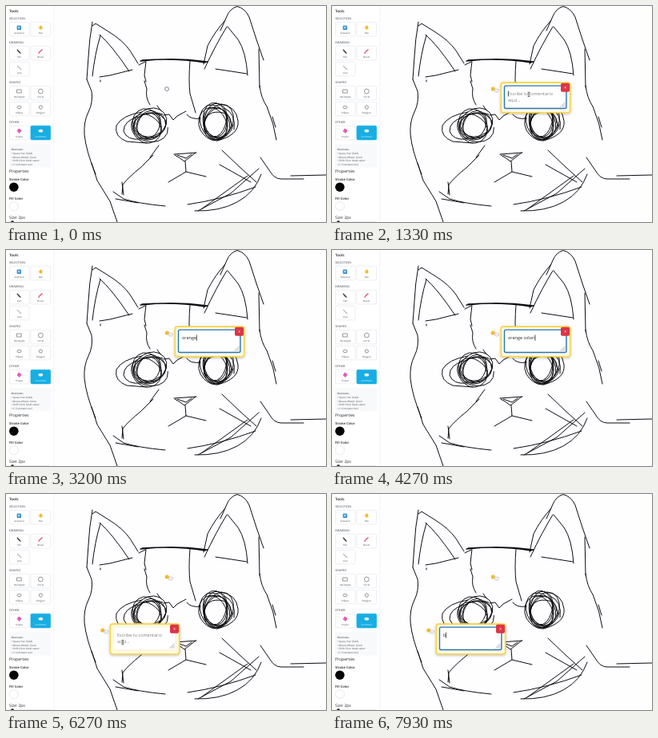
An HTML page that plays this animation: 400x271 px, repeating every 8 s.

```html
<!DOCTYPE html>
<html lang="en">
<head>
<meta charset="utf-8">
<title>Drawing board with comments</title>
<style>
  html, body { margin: 0; width: 100%; height: 100%; overflow: hidden; background: #fff; }
  svg { display: block; width: 100vw; height: 100vh; }
  text { font-family: "Open Sans", "Noto Sans", sans-serif; text-rendering: geometricPrecision; fill: #202327; white-space: pre; }
  .ink { fill: none; stroke: #0c0c10; stroke-width: 1; stroke-linecap: round; stroke-linejoin: round; }
  .heading { font-size: 3.8px; font-weight: 600; fill: #6b7178; }
  .label { font-size: 2.95px; text-anchor: middle; fill: #3f454c; }
  .hint { font-size: 3.1px; fill: #4a5058; }
  .bold { font-weight: 600; }
  .prop { font-size: 4.15px; font-weight: 600; }
  .line { fill: none; stroke: #555; stroke-width: .6; }
  .note { font-size: 5.5px; fill: #222; }
  .placeholder { fill: #808080; }
</style>
</head>
<body>
<svg viewBox="0 0 400 271" preserveAspectRatio="none">
  <defs>
    <filter id="shadow" x="-20%" y="-30%" width="140%" height="170%">
      <feDropShadow dx="0" dy="1.3" stdDeviation="1.6" flood-color="#000" flood-opacity=".25"/>
    </filter>
    <g id="pin">
      <circle r="2.6" fill="#f2bd2c"/>
      <path d="M1.4.4Q4.4-.8 7 .8Q7.8 3 5.8 4.2L3 4Z" fill="#f4f0f4" stroke="#a9a5aa" stroke-width=".5"/>
    </g>
  </defs>
  <rect width="400" height="271" fill="#fefdff"/>

  <g id="cat" class="ink">
    <path d="M108 20Q104 42 103 64L101 92M108 25L112 22L128 32Q146 43 155 56L165 72M166 74L174 70"/>
    <path d="M118 37Q111 60 108 88M117 36Q132 49 154 82M117 89L130 87L158 80M118 93V95"/>
    <path d="M101 92L107 107Q109 121 103 133Q97 145 98 161Q100 182 112 211M107 197L114 219L130 245L139 271"/>
    <path d="M168 69Q209 64 252 70M170 68Q215 65 249 71" stroke-width="1.35"/>
    <path d="M175 69L173 87L175 95M173 94L176 104Q174 115 180 124M189 125L193 131M189 134L196 136M197 137L204 136L209 143L214 138L225 132"/>
    <path d="M230 69Q228 93 230 110L237 134M226 136Q231 143 243 141"/>
    <path d="M247 73L252 50Q261 32 274 18M268 31L276 13Q280 3 289 .5Q299 3 304 14L313 42L322 68M316 54L317 102"/>
    <path d="M276 26Q263 47 248 79M277 26L290 42Q300 57 302 87M262 79L282 82L301 85"/>
    <path d="M317 100Q319 116 326 126Q335 147 338 168M333 139L337 152"/>
    <path d="M318 190L329 206Q335 217 344 217H372M356 213L400 212"/>
    <path d="M191 175L180 190M184 187L169 202Q153 215 146 224L145 236M145 221L147 237"/>
    <path d="M134 233L147 242Q166 248 199 251M137 242L165 247"/>
    <path d="M236 257Q267 258 289 246T319 211M227 249Q269 243 312 227M240 257L281 235L316 204"/>
    <path d="M270 181L292 202L313 221M267 199L306 221M244 255L302 213"/>
    <path d="M210 186L238 184M211 187Q217 190 223 195L237 184M214 187L225 191L232 186M224 195L225 208L203 221M225 208L250 214"/>
    <path d="M170 133Q145 137 138 150Q135 164 151 170L176 172M165 139Q147 144 147 157Q151 169 169 167"/>
    <path d="M269 123Q288 126 290 144T264 169M273 128Q288 135 285 155"/>
    <path id="leftEye"/>
    <path id="rightEye"/>
  </g>

  <g id="sidebar">
    <rect width="59.5" height="271" fill="#fff"/>
    <path d="M59.7 0V271" stroke="#eff0f3" stroke-width=".7"/>
    <text x="4" y="8" class="bold" font-size="4.6">Tools</text>
    <g id="buttons"></g>

    <rect x="13.6" y="24.5" width="5.4" height="5.4" rx="1" fill="#3a92d6"/>
    <path d="M15 25.7L18 27L16.6 27.5L16 29Z" fill="#fff"/>
    <path d="M40.5 26L42 26.8L42.3 24.5L45 25L45.6 28Q44 31 42 29Z" fill="#f3bd31"/>
    <path d="M14 54L18 58L19 60L16.5 59L13.5 55.5Z" fill="#3c4650"/>
    <path d="M41 60Q40.8 58 42 57.5L45.5 54.5" fill="none" stroke="#d84360" stroke-width="1.1"/>
    <path d="M14 75L19 80" class="line" stroke-width="1"/>
    <rect x="13.7" y="105" width="5.4" height="4" class="line"/>
    <circle cx="43.3" cy="107" r="2.9" class="line"/>
    <ellipse cx="16.5" cy="127" rx="2.6" ry="1.7" class="line"/>
    <path d="M42.3 125H44.5L45.6 127L44.5 129H42.3L41.2 127Z" class="line"/>
    <path d="M13.5 157L16 153.5L19.5 156L17 160Z" fill="#e45ab8"/>
    <ellipse cx="43.3" cy="156.7" rx="2.8" ry="1.9" fill="#fff"/>

    <rect x="4" y="173" width="52.5" height="29.5" rx="1.5" fill="#f8f9fa"/>
    <g id="hints"></g>
    <text x="4" y="209.4" font-size="5.1">Properties</text>
    <text x="4" y="219.2" class="prop">Stroke Color</text>
    <circle cx="9.8" cy="227.2" r="5.8" fill="#050505"/>
    <text x="4" y="243.2" class="prop">Fill Color</text>
    <circle cx="9.8" cy="251.3" r="5.6" fill="#fff" stroke="#d9dce0" stroke-width=".6"/>
    <text x="4" y="267" font-size="4.9">Size: 2px</text>
    <path d="M4 271H55" stroke="#d5d8dc"/>
    <circle cx="8" cy="271.2" r="1.9" fill="#222"/>
  </g>

  <use id="pinA" href="#pin" x="201.3" y="104"/>
  <use id="pinB" href="#pin" x="120.8" y="171"/>

  <g id="popup">
    <rect x=".8" y=".8" width="86.4" height="37.6" rx="3" fill="#fff9e2" stroke="#f8d643" stroke-width="1.6" filter="url(#shadow)"/>
    <rect id="field" x="5" y="4.8" width="77.4" height="28.4" rx="2" fill="#fff"/>
    <path d="M77.2 31.4L81 27.6M79.3 31.4L81 29.7M75 31.4L81 25.4" stroke="#777" stroke-width=".55"/>
    <rect x="75.5" y="1.4" width="11" height="11" rx="1.8" fill="#dc3545"/>
    <path d="M80.2 6.1L82 7.9M82 6.1L80.2 7.9" stroke="#fff" stroke-width=".8"/>
    <g id="placeholder">
      <text class="note placeholder" x="9.5" y="16.7">Escribe tu comentario</text>
      <text class="note placeholder" x="9.5" y="25.2">aquí...</text>
    </g>
    <text id="typed" class="note" x="9.5" y="16.7"></text>
    <rect id="caret" y="11.2" width=".7" height="7.2" fill="#111"/>
  </g>

  <g id="cursor">
    <path id="hand" d="M-2.2-.8Q-2.2-2.5-.8-2Q0-2.8.8-2Q2.3-2.2 2.2-.4V1Q1.8 2.5.3 2.6Q-1.4 2.5-2.2 1Z" fill="#fff" stroke="#444" stroke-width=".65"/>
    <path id="beam" d="M-1.4-2.8Q0-2.8 0-2Q0-2.8 1.4-2.8M0-2V2M-1.4 2.8Q0 2.8 0 2Q0 2.8 1.4 2.8" fill="none" stroke="#222" stroke-width=".7"/>
  </g>
</svg>
<script>
const LOOP = 8000, BLINK = 530;
const $ = id => document.getElementById(id);
const show = (id, on) => $(id).setAttribute('visibility', on ? 'inherit' : 'hidden');

function addTo(parent, tag, attrs, text = '') {
  const el = document.createElementNS('http://www.w3.org/2000/svg', tag);
  for (const key in attrs) el.setAttribute(key, attrs[key]);
  el.textContent = text;
  parent.append(el);
}

function buildSidebar() {
  const sections = [
    ['SELECTION', 17, ['Selection', 'Pan']],
    ['DRAWING', 47, ['Pen', 'Brush', 'Line']],
    ['SHAPES', 97, ['Rectangle', 'Circle', 'Ellipse', 'Polygon']],
    ['OTHER', 147, ['Eraser', 'Comment']]
  ];
  for (const [title, top, names] of sections) {
    addTo($('buttons'), 'text', { x: 4, y: top, class: 'heading' }, title);
    names.forEach((name, i) => {
      const x = 4.3 + i % 2 * 26.6, y = top + 3.3 + (i >> 1) * 20;
      const active = name === 'Comment';
      addTo($('buttons'), 'rect', {
        x, y, width: 24.8, height: 17.6, rx: 1.6, 'stroke-width': .6,
        fill: active ? '#18aee3' : '#fff', stroke: active ? '#18aee3' : '#e0e3e7'
      });
      const label = { x: x + 12.4, y: y + 14.2, class: 'label' };
      if (active) label.style = 'fill:#fff';
      addTo($('buttons'), 'text', label, name);
    });
  }
  addTo($('hints'), 'text', { x: 6.5, y: 180.7, class: 'hint bold' }, 'Shortcuts:');
  ['Space: Pan (hold)', 'Mouse Wheel: Zoom', 'Shift+Click: Multi-select', 'C: Comment tool']
    .forEach((hint, i) => addTo($('hints'), 'text', { x: 6.5, y: 186.3 + i * 4.5, class: 'hint' }, '• ' + hint));
}

// Overlapping hand-drawn loops around a centre
function scribble(cx, cy, rx, ry, turns, phase) {
  let d = '';
  for (let i = 0; i <= turns * 18; i++) {
    const a = i / 18 * Math.PI * 2;
    const r = .83 + .11 * Math.sin(a * .37 + phase) + .08 * Math.sin(a * 2.23 + phase);
    const x = cx + rx * r * Math.cos(a) + 3 * Math.sin(a * .19 + phase);
    const y = cy + ry * r * Math.sin(a) + 2.5 * Math.cos(a * .27);
    d += (i ? 'L' : 'M') + x.toFixed(1) + ' ' + y.toFixed(1);
  }
  return d;
}

// Time, x, y
const route = [
  [0, 201, 104], [600, 201, 104], [1000, 243, 113], [1270, 243, 113], [1330, 246, 111],
  [4930, 230, 121], [5200, 230, 121], [5560, 123, 149], [5650, 123, 149], [5930, 121, 171],
  [6070, 121, 171], [6260, 146, 186], [LOOP, 146, 186]
];

function cursorAt(t) {
  const i = route.findIndex(p => p[0] > t);
  const [t0, x0, y0] = route[i - 1], [t1, x1, y1] = route[i];
  const p = (t - t0) / (t1 - t0), e = p * p * (3 - 2 * p);
  return [x0 + (x1 - x0) * e, y0 + (y1 - y0) * e];
}

const notes = [
  { x: 210.5, y: 95.3, open: 530, focus: 1070, close: 4930, text: 'orange coloring',
    keys: [2200, 2400, 2530, 2730, 2930, 3130, 3400, 3530, 3670, 3930, 4030, 4130, 4250, 4400, 4530] },
  { x: 129.5, y: 162.3, open: 6070, focus: 6600, close: LOOP, text: 'b', keys: [7925] }
];

function drawNote(note, t) {
  show('popup', !!note);
  if (!note) return;
  const count = note.keys.filter(k => k <= t).length;
  const focused = t >= note.focus;
  const lastInput = count ? note.keys[count - 1] : note.focus;
  $('popup').setAttribute('transform', `translate(${note.x} ${note.y})`);
  $('field').setAttribute('stroke', focused ? '#2474bd' : '#eceae2');
  $('field').setAttribute('stroke-width', focused ? 1.4 : .6);
  $('typed').textContent = note.text.slice(0, count);
  show('placeholder', !count);
  $('caret').setAttribute('x', 9.4 + (count ? $('typed').getComputedTextLength() : 0));
  show('caret', focused && Math.floor((t - lastInput) / BLINK) % 2 === 0);
}

function draw(t) {
  const note = notes.find(n => t >= n.open && t < n.close);
  drawNote(note, t);
  show('pinA', t >= notes[0].open);
  show('pinB', t >= notes[1].open);

  const [x, y] = cursorAt(t);
  const overField = !!note && x > note.x + 5 && x < note.x + 82 && y > note.y + 5 && y < note.y + 33;
  $('cursor').setAttribute('transform', `translate(${x} ${y})`);
  show('cursor', !note || t < note.keys[0]);
  show('hand', !overField);
  show('beam', overField);
}

buildSidebar();
$('leftEye').setAttribute('d', scribble(178, 150, 22, 21, 7, 1));
$('rightEye').setAttribute('d', scribble(263, 146, 20, 24, 8, 2.4));

function tick() {
  draw(performance.now() % LOOP);
  requestAnimationFrame(tick);
}
tick();
</script>
</body>
</html>
```
